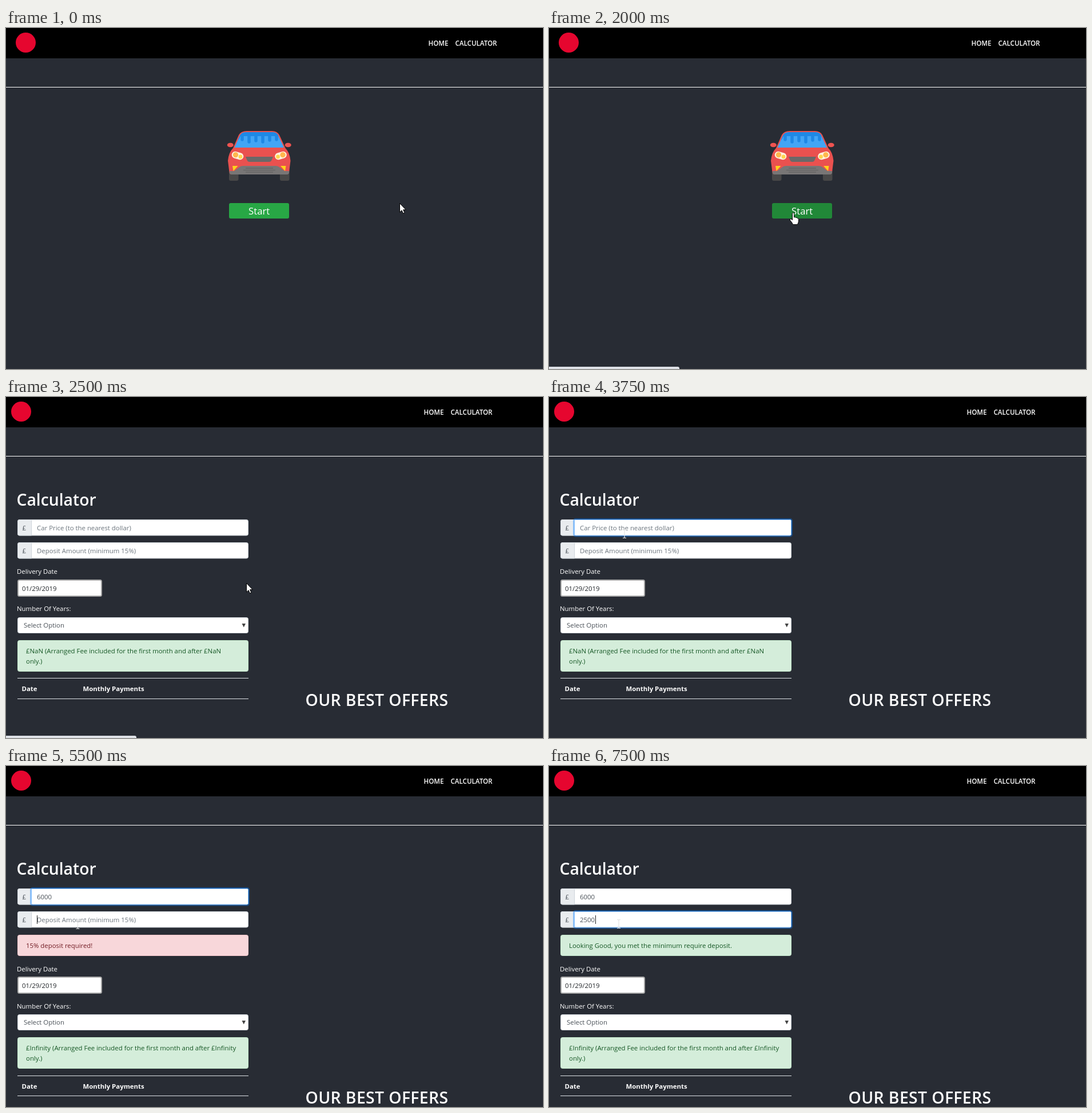
Write an HTML page that moves like this. It is 939 px wide and 596 px high and loops after 8 s.

```html
<!DOCTYPE html>
<html lang="en">
<head>
<meta charset="utf-8">
<style>
  html, body { margin: 0; width: 100%; height: 100%; overflow: hidden; background: #282c34; }
  svg { display: block; width: 939px; height: 596px; }
  text { font: 11.4px "Open Sans", "Noto Sans", sans-serif; fill: #fff; white-space: pre; }
  .nav { font-size: 11.6px; font-weight: 600; }
  .h1 { font-size: 28.3px; font-weight: 600; }
  .th { font-weight: 700; }
  .start { font-size: 16.8px; }
  .val { fill: #495057; }
  .good { fill: #155724; }
  .field { fill: #fff; stroke: #ced4da; }
  .okbox { fill: #d4edda; stroke: #c3e6cb; }
  .line { fill: #dee2e6; }
</style>
</head>
<body>
<svg viewBox="0 0 939 596">
  <rect width="939" height="596" fill="#282c34"/>
  <rect width="939" height="53" fill="#000"/>
  <rect y="103" width="939" height="1" fill="#fff"/>
  <g id="bar">
    <circle cx="34.5" cy="25.5" r="17.5" fill="#e6062f"/>
    <text class="nav" x="738.500" y="31">HOME</text>
    <text class="nav" x="785.500" y="31">CALCULATOR</text>
  </g>

  <g id="home">
    <rect x="390" y="246" width="16.500" height="21" rx="3" fill="#484848"/>
    <rect x="479" y="246" width="16.500" height="21" rx="3" fill="#484848"/>
    <ellipse cx="392.300" cy="204.500" rx="5.500" ry="3.800" fill="#ef5350"/>
    <ellipse cx="493.200" cy="204.500" rx="5.500" ry="3.800" fill="#ef5350"/>
    <path fill="#ea514f" d="M397 210L407 187Q411 180 421 180H465Q474 180 478 187L488.500 210Q496 217 497.500 232L495 252Q494 256 490 256H395Q391 256 390.500 252L388 232Q389.500 217 397 210Z"/>
    <path fill="#42a5f5" d="M399.500 209L409 188Q412 182 420 182H466Q473 182 476 188L486 209Z"/>
    <path fill="#1e88e5" d="M405 197L409 188Q412 182 420 182H466Q473 182 476 188L480 197Q478 194 476 189H410Q408 194 405 197Z"/>
    <g id="drips" stroke="#1e88e5" stroke-width="5.500" stroke-linecap="round"></g>
    <path fill="#6b6868" d="M419 225H467L464 232Q463 234 460 234H426Q423 234 422 232Z"/>
    <path fill="#787676" d="M414 241H472Q476 241 479 244L487 250H495V253Q494.500 256 491 256H395Q391 256 391 253V250H399L407 244Q410 241 414 241Z"/>
    <path stroke="#666" stroke-width="1.500" d="M419 245H467M415 248.500H471M419 252H467" fill="none"/>
    <g id="lamps">
      <rect x="394.500" y="217" width="21" height="12" rx="6" fill="#fff3e0" transform="rotate(17 405 223)"/>
      <circle cx="401.500" cy="221.800" r="4.700" fill="#ffb74d"/>
      <circle cx="410" cy="225" r="3.400" fill="#ffd54f"/>
      <path d="M396 241H405.500L397.500 250Z" fill="#fdd31b"/>
    </g>
    <use href="#lamps" transform="translate(885.500 0) scale(-1 1)"/>
    <rect id="btn" x="390" y="306" width="105" height="27" rx="3"/>
    <text class="start" x="424" y="326">Start</text>
  </g>

  <g id="calc">
    <text class="h1" x="18.500" y="190">Calculator</text>
    <g id="fields"></g>
    <g id="note">
      <rect x="20.500" y="295.500" width="403" height="36" rx="3"/>
      <text x="35" y="318"></text>
    </g>
    <!-- data-top: layout position before rounding to whole pixels -->
    <g id="lower">
      <text data-top="304.1" x="19" y="309">Delivery Date</text>
      <g data-top="318.6">
        <rect x="21" y="320" width="146" height="28" rx="2.500" fill="#fff" stroke="#a9a9a9" stroke-width="2"/>
        <text x="28" y="339" style="fill:#212529">01/29/2019</text>
      </g>
      <text data-top="369.2" x="19" y="374">Number Of Years:</text>
      <g data-top="384.6">
        <rect class="field" x="20.500" y="385.500" width="403" height="27" rx="3"/>
        <text class="val" x="31" y="403">Select Option</text>
        <path d="M412.500 396H419L415.750 402.500Z" fill="#444"/>
      </g>
      <g data-top="424.6">
        <rect class="okbox" x="20.500" y="425.500" width="403" height="54" rx="3"/>
        <text class="good" id="fee" x="35" y="448"></text>
        <text class="good" x="35" y="466">only.)</text>
      </g>
      <g data-top="491.2">
        <rect class="line" x="20" y="491" width="404" height="1"/>
        <text class="th" x="27.500" y="514">Date</text>
        <text class="th" x="134.500" y="514">Monthly Payments</text>
      </g>
      <rect data-top="526.6" class="line" x="20" y="527" width="404" height="1"/>
      <text data-top="529.3" class="h1" x="523.500" y="540" style="letter-spacing:.4px">OUR BEST OFFERS</text>
    </g>
  </g>

  <path id="status" d="M0 592H225Q228 592 228 595V596H0Z" fill="#dee1e6"/>
  <g id="pointer">
    <path id="arrow" d="M.5.500V16L4 12.700L6.500 18L9 17L6.600 11.700H11.200Z" fill="#fff" stroke="#000"/>
    <path id="hand" d="M-1.500 2Q0-1 1.500 2V9Q3.500 7.500 4.500 9.500Q6.500 8.500 7.300 10.500Q9.500 10 9.500 12.500V16Q9 18 7.500 21.500H-.5Q-2 17.500-5.500 14Q-6.500 11.500-4 11.500L-1.500 13.500Z" fill="#fff" stroke="#000"/>
    <path id="beam" d="M-3-7.500H-1L0-6.500L1-7.500H3M0-6.500V6.500M-3 7.500H-1L0 6.500L1 7.500H3" fill="none" stroke="#e4e4e4" stroke-width="1.200"/>
  </g>
</svg>
<script>
const LOOP = 8000, STEP = 250, NOTE_HEIGHT = 49.5;
const $ = id => document.getElementById(id);
const show = (el, on) => el.setAttribute('visibility', on ? 'inherit' : 'hidden');
const move = (el, x, y) => el.setAttribute('transform', `translate(${x} ${y})`);

// time, x, y of the pointer's hot spot
const path = [
  [0, 688, 306], [250, 692, 286], [500, 650, 232], [750, 575, 226], [1000, 500, 280],
  [1250, 440, 322], [1500, 430, 322], [2000, 427, 322], [2250, 424, 323], [2500, 420, 325],
  [2750, 404, 318], [3250, 220, 262], [3500, 142, 235], [3750, 132, 239], [4250, 130, 239],
  [5000, 130, 239], [5250, 128, 262], [5500, 125.5, 277], [6000, 122.5, 276], [6250, 122, 276]
];

function pointerAt(t) {
  const i = path.findIndex(p => p[0] > t);
  if (i < 0) return path[path.length - 1].slice(1);
  const [a, b] = [path[i - 1], path[i]];
  const k = (t - a[0]) / (b[0] - a[0]);
  return [1, 2].map(j => a[j] + (b[j] - a[j]) * k);
}

const typed = (word, from, t) =>
  word.slice(0, Math.max(0, Math.floor((t - from) / STEP) + 1));

function makeField(y, hint) {
  const g = document.createElementNS('http://www.w3.org/2000/svg', 'g');
  g.innerHTML = `
    <rect class="field" x="20.500" y="${y + .5}" width="403" height="27.500" rx="3"/>
    <path d="M44.500 ${y + .5}H23.500Q20.500 ${y + .5} 20.500 ${y + 3.5}V${y + 25}Q20.500 ${y + 28} 23.500 ${y + 28}H44.500Z" fill="#e9ecef" stroke="#ced4da"/>
    <text class="val" x="28.500" y="${y + 19}">£</text>
    <g>
      <rect x="43" y="${y - 1}" width="382" height="30.500" rx="3.500" fill="none" stroke="#007bff" stroke-opacity=".4" stroke-width="2"/>
      <rect x="44.500" y="${y + .5}" width="379" height="27.500" rx="2" fill="#fff" stroke="#80bdff"/>
    </g>
    <text x="54" y="${y + 19}"></text>
    <rect y="${y + 7}" width="1" height="15" fill="#222"/>`;
  $('fields').append(g);
  const [, , , ring, label, caret] = g.children;
  return (value, focus, blink) => {
    show(ring, focus);
    label.textContent = value || hint;
    label.style.fill = value ? '#495057' : '#6c757d';
    caret.setAttribute('x', Math.round(54 + value.length * 6.7));
    show(caret, blink);
  };
}

const price = makeField(214, 'Car Price (to the nearest dollar)');
const deposit = makeField(254, 'Deposit Amount (minimum 15%)');

$('drips').innerHTML = [195, 199, 197, 199, 196, 195]
  .map((y, i) => `<path d="M${413 + i * 12} 188V${y}"/>`).join('');

// Moves each row down, keeping it on whole pixels
function pushDown(shift) {
  for (const row of $('lower').children) {
    const top = +row.dataset.top;
    move(row, 0, Math.round(top + shift) - Math.round(top));
  }
}

function draw(time) {
  const t = Math.floor(time / STEP) * STEP;
  const onCalc = t >= 2250, entered = t >= 4250;
  const hover = t >= 1250 && !onCalc;

  show($('home'), !onCalc);
  show($('calc'), onCalc);
  move($('bar'), onCalc ? -8 : 0, 0);
  $('btn').setAttribute('fill', hover ? '#218838' : '#28a745');
  show($('status'), t >= 1750 && t < 3000);

  const sum = typed('2500', 6750, t);
  price(typed('6000', 4250, t), t >= 3500 && t < 5750, t === 3500 || (entered && t < 5500));
  deposit(sum, t >= 5750, t === 5500 || t === 5750 || t >= 6750);

  const met = sum === '2500';
  const [box, msg] = $('note').children;
  show($('note'), onCalc && t >= 4500);
  box.setAttribute('fill', met ? '#d4edda' : '#f8d7da');
  box.setAttribute('stroke', met ? '#c3e6cb' : '#f5c6cb');
  msg.style.fill = met ? '#155724' : '#721c24';
  msg.textContent = met ? 'Looking Good, you met the minimum require deposit.' : '15% deposit required!';

  pushDown(entered ? NOTE_HEIGHT : 0);
  const fee = entered ? '£Infinity' : '£NaN';
  $('fee').textContent = `${fee} (Arranged Fee included for the first month and after ${fee}`;

  move($('pointer'), ...pointerAt(t));
  show($('hand'), hover);
  show($('beam'), t >= 3500);
  show($('arrow'), !hover && t < 3500);
}

const begin = performance.now();
function tick() {
  draw((performance.now() - begin) % LOOP);
  requestAnimationFrame(tick);
}
tick();
</script>
</body>
</html>
```
